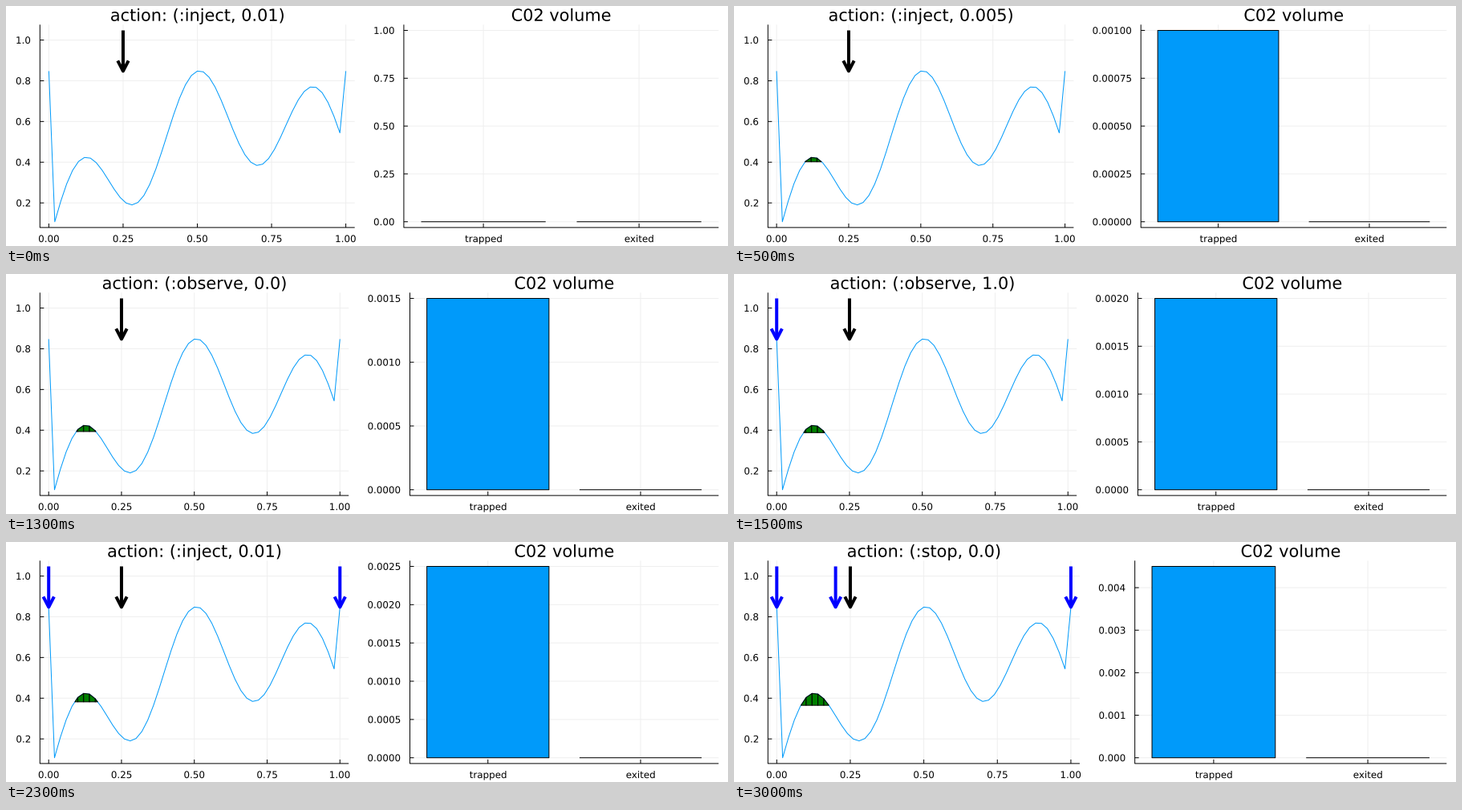
A matplotlib script for the animation above (3500 ms loop, 900 px wide and 300 px high).

```python
import numpy as np
import matplotlib.pyplot as plt
from matplotlib.animation import FuncAnimation
from matplotlib.patches import PathPatch
from matplotlib.path import Path
from matplotlib.textpath import TextPath

plt.rcParams["font.family"] = "DejaVu Sans"

W, H, DPI = 900, 300, 100
PX = 72 / DPI
BLUE = "#009AFA"
GRID = "#efefef"
LABEL_SIZE, TITLE_SIZE = 11.9, 20.83

# Shared panel layout in pixels, y pointing down
LEFT, RIGHT = 42.3, 888.3
TOP, BOTTOM = 23.3, 276.9
DATA_TOP, DATA_BOTTOM = 30.5, 269.7
TICK = 5

# action, amount, trapped volume, fill level, tick step, tick decimals
STEPS = [
    ("inject", 0.01, 0.0, None, 0.25, 2),
    ("inject", 0.005, 0.001, 0.402, 0.00025, 5),
    ("observe", 0.0, 0.0015, 0.3935, 0.0005, 4),
    ("observe", 1.0, 0.002, 0.388, 0.0005, 4),
    ("inject", 0.01, 0.0025, 0.382, 0.0005, 4),
    ("observe", 0.2, 0.0035, 0.3725, 0.001, 3),
    ("stop", 0.0, 0.0045, 0.365, 0.001, 3),
]

grid_x = np.linspace(0, 1, 51)
surface = (0.241 * np.sin(5 * np.pi * grid_x)
           + 0.379 * np.sin(np.pi * grid_x) + 0.455 * grid_x)
peak = surface.max()
surface[[0, -1]] = peak
LOW, HIGH = surface.min(), peak + 0.2

fig = plt.figure(figsize=(W / DPI, H / DPI), dpi=DPI, facecolor="white")
ax = fig.add_axes([0, 0, 1, 1])


def line(xs, ys, color="black", width=1.0, z=2, cap="butt"):
    ax.plot(xs, ys, color=color, lw=width * PX, zorder=z, snap=False,
            solid_capstyle=cap, solid_joinstyle="round")


def shape(xs, ys, color, z):
    ax.fill(xs, ys, facecolor=color, edgecolor="black", lw=PX, zorder=z,
            snap=False, joinstyle="round")


def text(x, y, s, size=LABEL_SIZE, align=0.5):
    """Draw text as outlines, so it can sit between whole pixels."""
    glyphs = TextPath((0, 0), s, size=size)
    box = glyphs.get_extents()
    verts = glyphs.vertices * [1, -1] + [x - box.x0 - align * box.width, y]
    ax.add_patch(PathPatch(Path(verts, glyphs.codes), facecolor="black",
                           lw=0, zorder=6, snap=False))


def scale_y(v, low, high):
    return DATA_BOTTOM - (v - low) / (high - low) * (DATA_BOTTOM - DATA_TOP)


def panel(x0, x1, title, xticks, yticks):
    """Axes frame, grid and labels; ticks are (pixel, label) pairs."""
    for x, label in xticks:
        line([x, x], [TOP, BOTTOM], GRID, z=0)
        line([x, x], [BOTTOM, BOTTOM - TICK], z=1)
        text(x, 295.1, label)
    for y, label in yticks:
        line([x0, x1], [y, y], GRID, z=0)
        line([x0, x0 + TICK], [y, y], z=1)
        text(x0 - 12.2, y + 4.4, label, align=1)
    line([x0, x0, x1], [TOP, BOTTOM, BOTTOM], z=1)
    text((x0 + x1) / 2, 18.7, title, TITLE_SIZE)


def arrow(x, color):
    top, tip = scale_y(HIGH, LOW, HIGH), scale_y(peak, LOW, HIGH)
    line([x, x], [top, tip], color, 4, z=5)
    line([x - 6.7, x, x + 6.7], [tip - 13, tip, tip - 13], color, 4, z=5)


def plume(level, to_x, to_y):
    """Fill the first dome above the level, one polygon per grid cell."""
    for i in range(1, 14):
        xa, xb = grid_x[i:i + 2]
        ya, yb = surface[i:i + 2]
        if max(ya, yb) <= level:
            continue
        cross = xa + (level - ya) / (yb - ya) * (xb - xa)
        if ya < level:
            xa, ya = cross, level
        if yb < level:
            xb, yb = cross, level
        shape(to_x(np.array([xa, xa, xb, xb])),
              to_y(np.array([level, ya, yb, level])), "green", 4)


def draw_surface(frame, width):
    action, amount, _, level, _, _ = STEPS[frame]

    def to_x(v):
        return LEFT + (v + 0.03) / 1.06 * width

    def to_y(v):
        return scale_y(v, LOW, HIGH)

    panel(LEFT, LEFT + width, f"action: (:{action}, {amount})",
          [(to_x(v), f"{v:.2f}") for v in np.arange(5) / 4],
          [(to_y(v), f"{v:.1f}") for v in np.arange(1, 6) / 5])
    line(to_x(grid_x), to_y(surface), BLUE, z=3)
    if level is not None:
        plume(level, to_x, to_y)
    arrow(to_x(0.25), "black")
    for name, where, *_ in STEPS[:frame]:
        if name == "observe":
            arrow(to_x(where), "blue")


def draw_volume(frame, width):
    _, _, volume, _, step, digits = STEPS[frame]
    high = volume or 1.0
    x0 = RIGHT - width
    unit = width / 2.0225
    middle = x0 + width / 2
    centers = [middle - unit / 2, middle + unit / 2]
    ticks = np.arange(int(high / step + 1e-6) + 1) * step
    panel(x0, RIGHT, "C02 volume", list(zip(centers, ["trapped", "exited"])),
          [(scale_y(v, 0, high), f"{v:.{digits}f}") for v in ticks])
    for center, value in zip(centers, [volume, 0.0]):
        xa, xb = center - 0.4 * unit, center + 0.4 * unit
        base, top = DATA_BOTTOM, scale_y(value, 0, high)
        if value:
            shape([xa, xa, xb, xb], [base, top, top, base], BLUE, 3)
        else:
            line([xa, xb], [base, base], z=3)


def draw(frame):
    ax.clear()
    ax.set_xlim(0, W)
    ax.set_ylim(H, 0)
    ax.axis("off")
    # Longer tick labels leave less room for both panels
    width = 392.4 - 3.77 * (STEPS[frame][5] - 2)
    draw_surface(frame, width)
    draw_volume(frame, width)
    return []


anim = FuncAnimation(fig, draw, frames=len(STEPS), interval=500,
                     init_func=lambda: [], repeat=True, repeat_delay=0)
plt.show()
```
